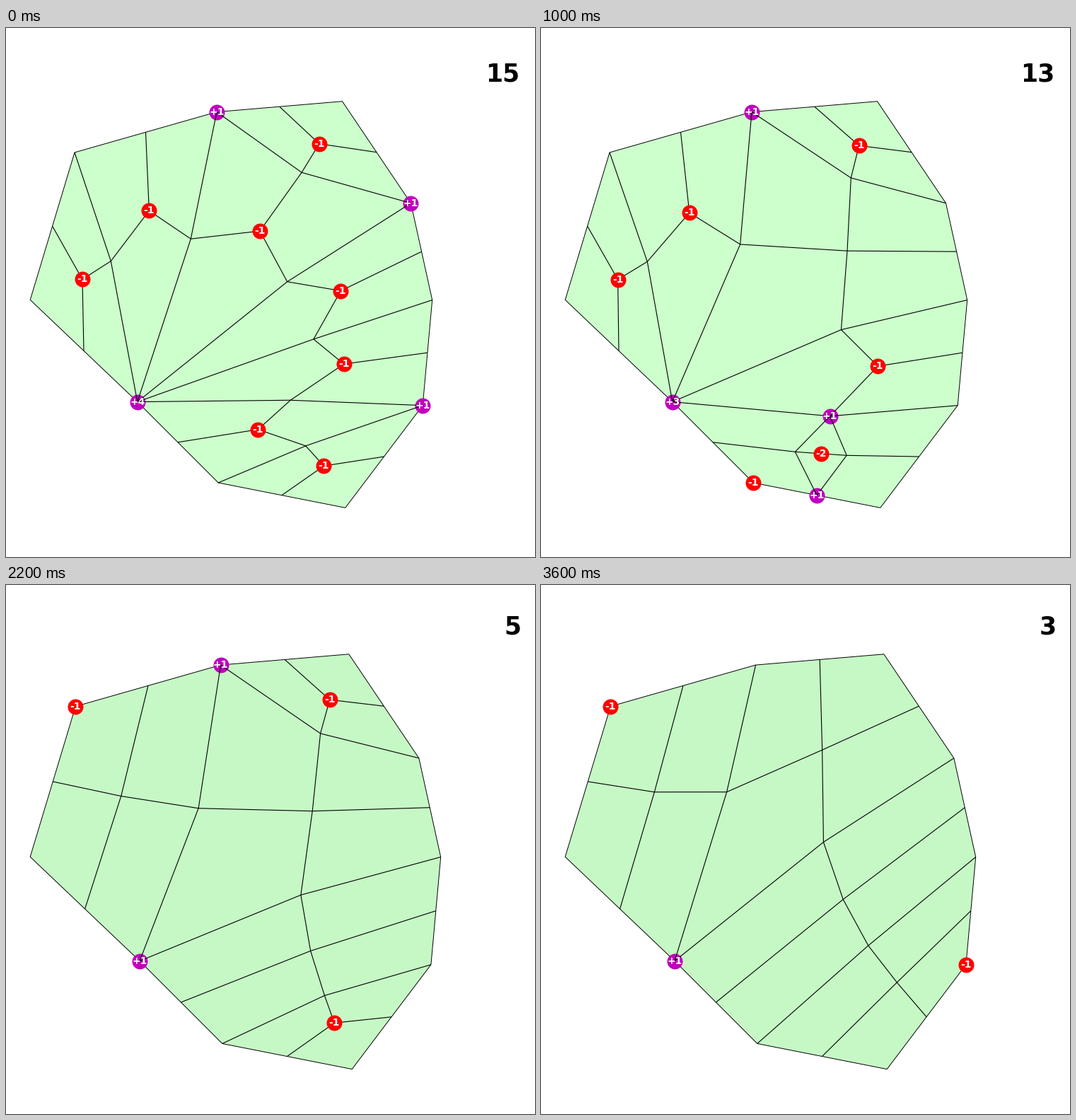
Write a matplotlib script that moves like this. It is 748x748 px and loops after 4600 ms.

```python
import numpy as np
import matplotlib.pyplot as plt
from matplotlib.animation import FuncAnimation
from matplotlib.collections import LineCollection

SIZE, DPI = 748, 100
PX = 72 / DPI
plt.rcParams["font.family"] = "DejaVu Sans"

CORNERS = np.array([
    (97, 176), (298, 118.7), (475.5, 103.7), (572.5, 247.7), (602.7, 384.6),
    (589.2, 533.7), (479.8, 678.4), (300.2, 643), (185.8, 528.6), (34.2, 384.4)])
N = 2 * len(CORNERS)
SHARP = {"4", "12", "18"}          # corners that want only two edges
ANCHOR, ZOOM = np.array([34.3, 384.4]), 1.0211

START = """a-19 a-17 a-c c-0 c-d c-16 d-1 d-e e-2 e-f e-16 f-g f-h g-2 g-i g-6
i-3 i-5 h-6 h-j h-16 j-7 j-k k-8 k-l k-16 l-9 l-m m-16 m-10 m-n n-15 n-o
o-14 o-10 o-p p-11 p-13"""

# "flip old new" turns an edge; "merge keep gone [drop]" collapses a quad
MOVES = [
    "flip h-6 g-j", "merge h k", "merge f j",
    "flip o-10 m-p", "flip o-14 n-13", "merge n p o",
    "flip c-16 a-e", "flip c-0 d-19", "merge a d c",
    "flip m-16 l-15", "flip n-15 m-14", "flip g-2 e-i",
    "merge 5 g", "merge i f", "flip h-8 7-l",
    "flip i-7 h-6", "flip m-10 9-n", "flip l-9 8-m"]

rim = np.empty((N, 2))
rim[::2] = CORNERS
rim[1::2] = (CORNERS + np.roll(CORNERS, -1, axis=0)) / 2
RIM = {str(i): p for i, p in enumerate(rim)}
RIM_EDGES = {frozenset((str(i), str((i + 1) % N))) for i in range(N)}


def edge(text):
    return frozenset(text.split("-"))


def apply_move(edges, move):
    kind, first, second, *drop = move.split()
    if kind == "flip":
        return edges - {edge(first)} | {edge(second)}
    merged = {frozenset(first if v == second else v for v in e) for e in edges}
    return {e for e in merged if not e & set(drop)}


def neighbours(edges):
    links = {}
    for a, b in map(tuple, edges):
        links.setdefault(a, []).append(b)
        links.setdefault(b, []).append(a)
    return links


def relax(links):
    """Place every inner vertex at the mean of its neighbours."""
    inner = sorted(v for v in links if v not in RIM)
    row = {v: i for i, v in enumerate(inner)}
    lhs, rhs = np.zeros((len(inner),) * 2), np.zeros((len(inner), 2))
    for v, i in row.items():
        lhs[i, i] = len(links[v])
        for w in links[v]:
            if w in row:
                lhs[i, row[w]] -= 1
            else:
                rhs[i] += RIM[w]
    return {**RIM, **dict(zip(inner, np.linalg.solve(lhs, rhs)))}


def excess(vertex, degree):
    if vertex in SHARP:
        return degree - 2
    return degree - (3 if vertex in RIM else 4)


states = [{edge(t) for t in START.split()} | RIM_EDGES]
for move in MOVES:
    states.append(apply_move(states[-1], move))

fig = plt.figure(figsize=(SIZE / DPI, SIZE / DPI), dpi=DPI, facecolor="white")
ax = fig.add_axes([0, 0, 1, 1])


def draw_marks(marks, color, zorder):
    if marks:
        x, y = np.array([p for p, _ in marks]).T
        ax.scatter(x, y, s=(22 * PX) ** 2, c=color, linewidths=0, zorder=zorder)
    for (x, y), d in marks:
        ax.text(x, y, f"{d:+d}", color="white", size=10, weight="bold",
                ha="center", va="center", zorder=5)


def draw(frame):
    ax.clear()
    ax.set(xlim=(0, SIZE), ylim=(SIZE, 0))
    ax.axis("off")

    edges = states[min(frame, len(states) - 1)]
    links = neighbours(edges)
    pos = relax(links)
    odd = {v: excess(v, len(links[v])) for v in links}
    score = sum(map(abs, odd.values()))

    wide = score >= 10
    if not wide:
        pos = {v: ANCHOR + (p - ANCHOR) * ZOOM for v, p in pos.items()}

    outline = [pos[str(i)] for i in range(N)]
    ax.add_patch(plt.Polygon(outline, fc="#ccffcc" if wide else "#c6f8c6",
                             ec="black", lw=0.7, zorder=1))
    inner = [[pos[v] for v in sorted(e)] for e in edges - RIM_EDGES]
    ax.add_collection(LineCollection(inner, colors="black", linewidths=0.8, zorder=3))

    draw_marks([(pos[v], d) for v, d in odd.items() if d > 0], "#bf00bf", 2)
    draw_marks([(pos[v], d) for v, d in odd.items() if d < 0], "red", 4)
    ax.text(*((678.6, 75) if wide else (704.7, 69)), str(score),
            size=25, weight="bold", ha="left", va="baseline")
    return []


anim = FuncAnimation(fig, draw, frames=23, interval=200, repeat=True,
                     repeat_delay=0, init_func=lambda: [])
plt.show()
```
